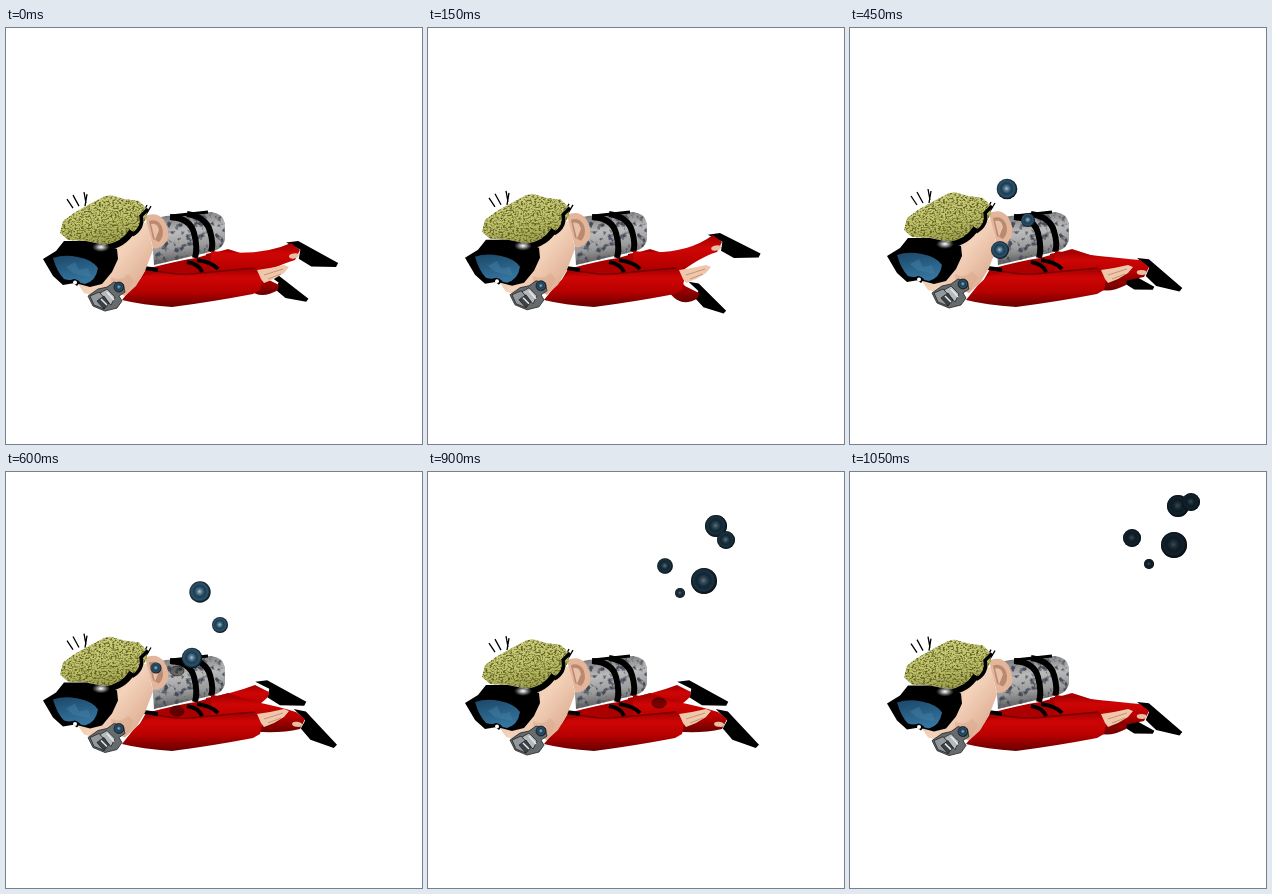
Recreate the animation shown at these times as an HTML page. Size 416 by 416 pixels, loop 1200 ms.

```html
<!DOCTYPE html>
<html lang="en">
<head>
<meta charset="utf-8">
<title>Diver</title>
<style>
html, body { margin: 0; width: 100%; height: 100%; overflow: hidden; background: #fff; }
svg { display: block; width: 100vw; height: 100vh; }
</style>
</head>
<body>
<svg viewBox="0 0 416 416">
  <defs>
    <linearGradient id="suit" x1="0" y1="0" x2="0" y2="1">
      <stop offset="0" stop-color="#9c0000"/><stop offset=".25" stop-color="#cf0505"/>
      <stop offset=".6" stop-color="#b80000"/><stop offset="1" stop-color="#600"/>
    </linearGradient>
    <linearGradient id="steel" x1=".4" y1="0" x2=".6" y2="1">
      <stop offset="0" stop-color="#777"/><stop offset=".35" stop-color="#bbb"/>
      <stop offset=".65" stop-color="#9b9b9b"/><stop offset="1" stop-color="#444"/>
    </linearGradient>
    <linearGradient id="skin" x1="0" y1="0" x2="1" y2=".8">
      <stop offset="0" stop-color="#dcae92"/><stop offset=".55" stop-color="#f4d3bb"/>
      <stop offset="1" stop-color="#d9a88c"/>
    </linearGradient>
    <linearGradient id="lens" x1="0" y1="0" x2=".3" y2="1">
      <stop offset="0" stop-color="#1b4767"/><stop offset="1" stop-color="#35749f"/>
    </linearGradient>
    <linearGradient id="hair" x1="0" y1="0" x2=".3" y2="1">
      <stop offset="0" stop-color="#d0d184"/><stop offset=".6" stop-color="#c3c56e"/>
      <stop offset="1" stop-color="#a3a553"/>
    </linearGradient>
    <radialGradient id="glint">
      <stop offset="0" stop-color="#fff"/><stop offset=".35" stop-color="#ccc" stop-opacity=".8"/>
      <stop offset="1" stop-color="#888" stop-opacity="0"/>
    </radialGradient>
    <radialGradient id="air" cx=".48" cy=".48">
      <stop offset="0" stop-color="#a9c3d2"/><stop offset=".22" stop-color="#54788f"/>
      <stop offset=".5" stop-color="#1c3c51"/><stop offset=".78" stop-color="#2a526b"/>
      <stop offset="1" stop-color="#0b151d"/>
    </radialGradient>
    <filter id="rough" x="0" y="0" width="1" height="1" color-interpolation-filters="sRGB">
      <feTurbulence type="fractalNoise" baseFrequency=".45 .6" numOctaves="2" seed="4"/>
      <feColorMatrix values="0 0 0 0 .38  0 0 0 0 .39  0 0 0 0 .13  3.5 0 0 0 -1.5"/>
      <feComposite operator="in" in2="SourceAlpha"/>
      <feMerge><feMergeNode in="SourceGraphic"/><feMergeNode/></feMerge>
    </filter>
    <filter id="mottle" x="0" y="0" width="1" height="1" color-interpolation-filters="sRGB">
      <feTurbulence type="fractalNoise" baseFrequency=".16" numOctaves="3" seed="9"/>
      <feColorMatrix values="0 0 0 0 .27  0 0 0 0 .3  0 0 0 0 .35  5 0 0 0 -2.6"/>
      <feComposite operator="in" in2="SourceAlpha"/>
      <feMerge><feMergeNode in="SourceGraphic"/><feMergeNode/></feMerge>
    </filter>
  </defs>
  <rect width="416" height="416" fill="#fff"/>

  <path id="farFin"/>
  <path id="farLeg" fill="url(#suit)"/>

  <g fill="none" stroke="#000">
    <path d="M145 191L160 188 205 184Q217 185 219 196V212Q217 220 208 223L148 237Z" fill="url(#steel)" stroke="none" filter="url(#mottle)"/>
    <path d="M164 189Q184 190 188 205T189 230" stroke-width="6"/>
    <path d="M181 186Q200 189 204 203T205 224" stroke-width="6"/>
    <path d="M165 188L202 184" stroke-width="3"/>
  </g>

  <path d="M128 262L140 241Q170 233 190 230L222 221 250 230 258 246 200 256Z" fill="#ac0000"/>
  <path id="nearFin"/>
  <path id="nearLeg" fill="url(#suit)"/>
  <g id="ankles" fill="#e7bea3"></g>

  <path d="M116 272L128 257 139 247Q165 242 190 246L249 240 257 248 254 262 247 266Q205 274 166 279Q136 277 116 272Z" fill="url(#suit)"/>
  <path d="M150 243Q175 248 195 245L248 240" fill="none" stroke="#700" stroke-width="1.5"/>
  <g fill="none" stroke="#000" stroke-width="4">
    <path d="M138 240L152 242M181 234Q193 236 196 244M191 232Q206 234 212 241"/>
  </g>
  <path d="M251 242L264 240 278 237 283 239 278 245 268 251 258 255 255 251Z" fill="#efc8ac"/>
  <path d="M258 247L277 241M262 251L275 246" stroke="#b98468" stroke-width=".8"/>
  <g id="shade" fill="#000" fill-opacity=".42" stroke="#100" stroke-opacity=".5"></g>

  <g id="head">
    <path d="M67 180L61 171M73 178L67 167M80 175L78 164M79 178L81 166M139 188L145 178M137 185L141 177" stroke="#000" stroke-width="1.3"/>
    <path d="M70 253L78 265 92 269 106 262 119 268 130 258 139 243 147 222 141 194 100 207Z" fill="url(#skin)"/>
    <path d="M105 249Q115 254 122 246L128 252 119 268 106 262Z" fill="#d9aa8e" opacity=".55"/>
    <path d="M139 188Q151 183 158 192Q165 204 161 213Q154 222 147 220Z" fill="#e3b59b"/>
    <path d="M143 193Q152 190 156 199Q159 208 153 214L147 211Z" fill="#b98970"/>
    <path d="M145 196Q151 194 153 202L149 212Z" fill="#e9c0a7"/>
    <path d="M54 205L57 193 68 185 82 177 97 169 104 167 118 171 133 173 140 180 141 189 135 199 126 205 116 214 101 217 80 213 62 212Z" fill="url(#hair)" filter="url(#rough)"/>
    <g fill="none" stroke="#000">
      <path d="M99 220Q118 217 126 203" stroke-width="6"/>
      <path d="M126 207Q138 200 135 188L142 181" stroke-width="3.5"/>
    </g>
    <path d="M37 231L50 223 58 213 80 213 100 217 111 221 112 231 106 244 96 256 84 259 69 255 57 257 47 248Z"/>
    <path d="M47 230Q58 226 72 229Q87 232 92 240Q90 253 79 256Q72 255 69 251Q64 253 58 251Q51 244 47 230Z" fill="url(#lens)"/>
    <path d="M60 239L69 234 73 242 82 240 85 249 74 247 67 245Z" fill="#4681a6" opacity=".45"/>
    <ellipse cx="95" cy="219" rx="9" ry="5" fill="url(#glint)"/>
    <path d="M64 253Q69 249 74 254L71 258Z"/>
    <circle cx="69" cy="254.500" r="2" fill="#fff"/>
    <g stroke="#222" stroke-width=".8">
      <path d="M82 268L92 261 101 259 108 254 117 256 119 264 113 268 116 273 111 280 99 283 87 278Z" fill="#666b6e"/>
      <path d="M84 268L93 264 101 271 98 281 88 277Z" fill="#92989b"/>
      <path d="M94 265L101 261 109 269 105 277Z" fill="#b5babc"/>
      <path d="M91 273L98 268 103 275 98 281Z" fill="#3b4145"/>
      <path d="M95 271L101 277M101 264L108 272" stroke="#e6e8e9" stroke-width="1.5"/>
      <circle cx="113" cy="259" r="5" fill="url(#air)"/>
    </g>
  </g>
  <g id="bubbles"></g>
</svg>
<script>
const STEP = 150, COUNT = 8;
const $ = id => document.getElementById(id);
const set = (id, d) => $(id).setAttribute('d', d);

// Outline of a fin, ankle at the origin, pointing right
const FIN = [[-11, -4], [0, -9.500], [45, -2.500], [44.400, 2], [21, 10], [6.500, 7], [5, -2]];

// Ankle x, y, fin angle and size, from one end of the kick to the other
const NEAR = [[289, 214, 18, 1], [289, 222, 20, 1], [294, 239, 32, .97], [294, 247, 38, 1], [294, 250, 41, 1.020]];
const FAR = [[266, 262, 36, .85], [268, 254, 29, .85], [272, 249, 20, .75], [258, 217, 20, .98], [257, 198, 9, .97]];
const KICK = [1, 0, 1, 2, 3, 4, 3, 2];

// Each track: first step, radius at start and end, then positions
const TRACKS = [
  [2, 10, 11, [122, 201], [157, 161], [194, 120], [239, 82], [288, 54], [328, 34]],
  [2, 6, 9, [142, 229], [178, 192], [214, 153], [256, 109], [298, 68], [341, 30]],
  [3, 9, 13, [150, 222], [186, 186], [228, 146], [276, 109], [324, 73]],
  [4, 5.500, 9, [150, 196], [194, 131], [237, 94], [282, 66]],
  [5, 5, 5, [197, 163], [252, 121], [299, 92]]
];
const SHADOWS = [[4, 171, 199], [4, 171, 239], [5, 173, 205], [6, 231, 231]];

function local([x, y, deg, size], px, py) {
  const a = deg * Math.PI / 180, c = Math.cos(a) * size, s = Math.sin(a) * size;
  return [x + px * c - py * s, y + px * s + py * c];
}

const finPath = pose => 'M' + FIN.map(p => local(pose, ...p)).join('L') + 'Z';

function nearLegPath([x, y]) {
  return `M205 223Q255 229 ${x - 4} ${y - 7}L${x + 5} ${y}L${x} ${y + 10}Q268 ${y + 16} 235 258L205 250Z`;
}

function farLegPath([x, y]) {
  return `M200 226Q225 ${y < 230 ? 222 : 219} ${x - 9} ${y - 4}L${x + 5} ${y + 3}L${x + 4} ${y + 8}Q245 ${y + 24} 232 243L200 244Z`;
}

function ankle(pose) {
  const [x, y] = local(pose, 1, 6);
  return `<ellipse cx="${x}" cy="${y}" rx="5" ry="2.500" transform="rotate(${pose[2] - 30} ${x} ${y})"/>`;
}

function bubble([start, r0, r1, ...spots], k) {
  const i = k - start;
  if (i < 0) return '';
  const [x, y] = spots[i], r = r0 + (r1 - r0) * Math.min(1, i / Math.min(3, spots.length - 1));
  const dim = Math.max(0, k - 4) * .22;
  const disc = fill => `<circle cx="${x}" cy="${y}" r="${r}" ${fill}/>`;
  return disc('fill="url(#air)"') + disc(`fill="#05090c" opacity="${dim}"`);
}

function draw(k) {
  const near = NEAR[KICK[k]], far = FAR[KICK[k]];
  set('nearFin', finPath(near));
  set('farFin', finPath(far));
  set('nearLeg', nearLegPath(near));
  set('farLeg', farLegPath(far));
  $('ankles').innerHTML = ankle(near);
  const bob = -1.2 + 1.8 * Math.cos((k - 7) * Math.PI / 4);
  $('head').setAttribute('transform', `translate(0 ${bob.toFixed(2)})`);
  $('shade').innerHTML = SHADOWS.filter(s => s[0] === k)
    .map(([, x, y]) => `<ellipse cx="${x}" cy="${y}" rx="7" ry="5"/>`).join('');
  $('bubbles').innerHTML = TRACKS.map(t => bubble(t, k)).join('');
}

const origin = performance.now();
let shown = 0;
function tick() {
  const k = Math.floor((performance.now() - origin) / STEP) % COUNT;
  if (k !== shown) draw(shown = k);
  requestAnimationFrame(tick);
}
draw(0);
requestAnimationFrame(tick);
</script>
</body>
</html>
```
